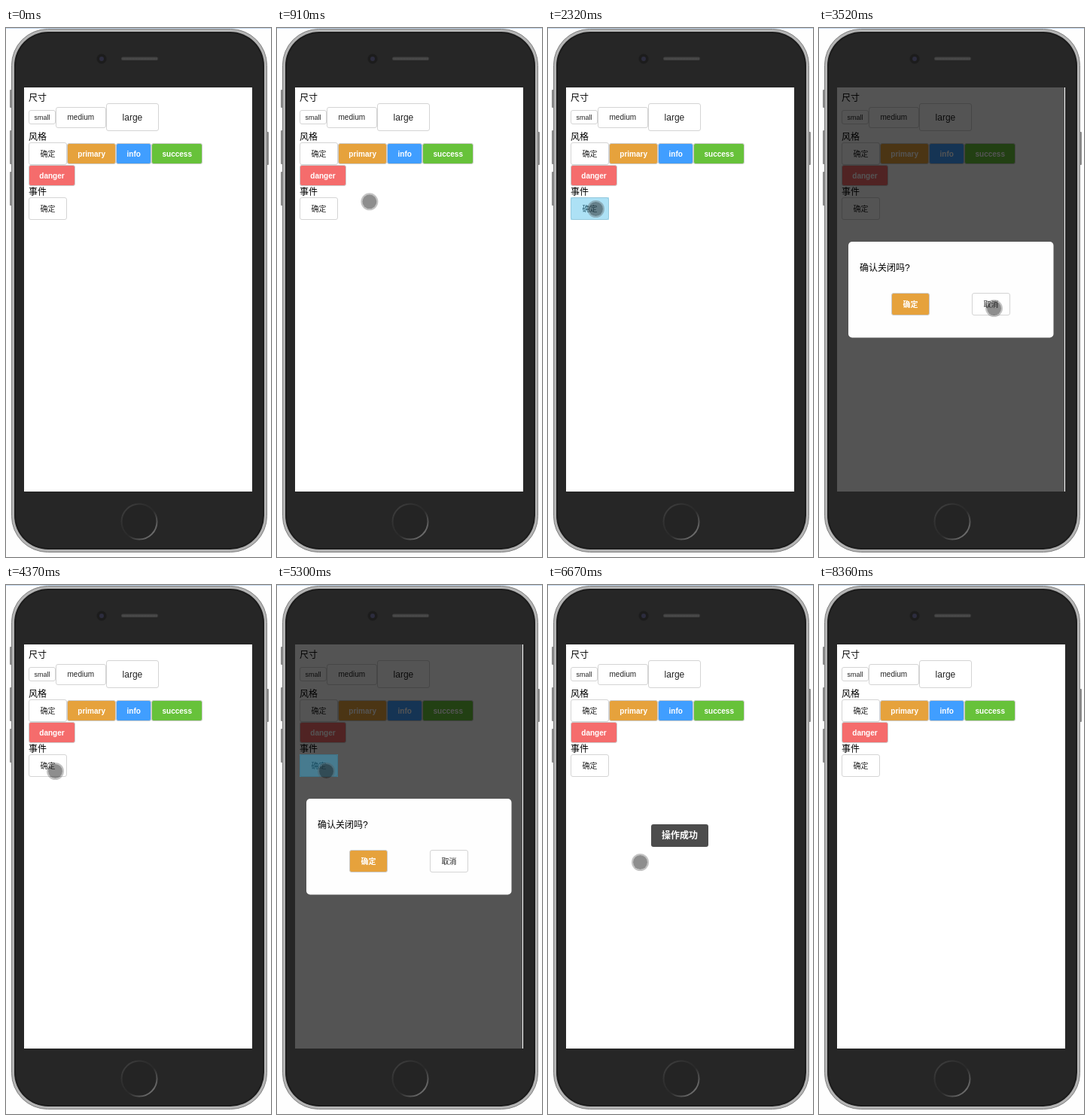
Recreate the animation shown at these times as an HTML page. Size 352 px wide and 703 px high, loop 8.92 s.

```html
<!DOCTYPE html>
<html lang="zh">
<head>
<meta charset="utf-8">
<style>
html, body { margin: 0; width: 100%; height: 100%; overflow: hidden; background: #fefefe; }
svg { display: block; width: 352px; height: 703px; }
text { font-family: "Liberation Sans", "Noto Sans CJK SC", "Noto Sans CJK", sans-serif; }
</style>
</head>
<body>
<svg viewBox="0 0 352 703" xmlns="http://www.w3.org/2000/svg">
  <defs>
    <linearGradient id="home" x1="0" x2="1" y1="0" y2="1">
      <stop offset="0" stop-color="#444"/><stop offset=".3" stop-color="#303030"/>
      <stop offset=".55" stop-color="#2a2a2a"/><stop offset="1" stop-color="#8a8a8a"/>
    </linearGradient>
  </defs>
  <rect width="352" height="1" fill="#c4d8ee"/>
  <g fill="#8a8a8a">
    <rect x="5" y="82" width="4" height="24" rx="1"/>
    <rect x="5" y="136" width="4" height="45" rx="1"/>
    <rect x="5" y="191" width="4" height="45" rx="1"/>
    <rect x="345" y="138" width="4" height="44" rx="1"/>
  </g>
  <rect x="7.5" y="1.5" width="339" height="695" rx="48" fill="#b4b4b4" stroke="#808080"/>
  <rect x="11" y="5" width="332" height="688" rx="45" fill="#1c1c1c"/>
  <rect x="13" y="7" width="328" height="684" rx="43" fill="#262626"/>
  <circle cx="127" cy="41" r="6.5" fill="#1c1c1c"/>
  <circle cx="127" cy="41" r="3" fill="#2c2c3e"/>
  <rect x="153" y="38.5" width="49" height="4.5" rx="2.2" fill="#404040"/>
  <path d="M155 40.8H200" stroke="#525252" stroke-width="2" stroke-dasharray="1 1"/>
  <circle cx="177" cy="656" r="23.5" fill="#242424" stroke="url(#home)" stroke-width="2"/>
  <rect x="24" y="79" width="303" height="537" fill="#fff"/>
  <g id="page"></g>
  <rect id="shade" x="24" y="79" width="302" height="537" fill-opacity=".67"/>
  <rect id="flash" x="30" y="225" width="51" height="30" fill="#33b5e5" fill-opacity=".4"/>
  <g id="dialog"><rect x="39" y="284" width="272.5" height="127.5" rx="5" fill="#fefefe"/></g>
  <g id="toast"><rect x="137" y="318" width="76" height="30" rx="3" fill="#4c4c4c"/></g>
  <g id="touch">
    <circle r="10.5" fill="none" stroke="#555" stroke-opacity=".35" stroke-width="2"/>
    <circle r="9.5" fill="#1e1e1e" fill-opacity=".5"/>
  </g>
</svg>
<script>
const LOOP = 8920;
const SAMPLE = 135;
const NS = "http://www.w3.org/2000/svg";
const $ = id => document.getElementById(id);

function add(parent, tag, attrs, label = "") {
  const el = document.createElementNS(NS, tag);
  for (const key in attrs) el.setAttribute(key, attrs[key]);
  el.textContent = label;
  parent.append(el);
  return el;
}

function write(parent, label, x, y, size = 12, fill = "#000", weight = 400) {
  return add(parent, "text", { x, y, "font-size": size, fill, "font-weight": weight }, label);
}

// Draws a button around its label and returns its right edge
function button(parent, label, x, mid, { size = 10, pad = 15.5, height = 30, fill } = {}) {
  const box = add(parent, "rect", { rx: 2.5, fill: fill || "#fff", stroke: fill ? "#ccc" : "#d4d4d4" });
  const text = write(parent, label, x + pad, mid + size * .38, size, fill ? "#fff" : "#222", fill ? 700 : 400);
  const right = x + text.getComputedTextLength() + 2 * pad;
  const left = Math.round(x), top = Math.round(mid - height / 2);
  const shape = { x: left + .5, y: top + .5, width: Math.round(right) - left - 1, height: height - 1 };
  for (const key in shape) box.setAttribute(key, shape[key]);
  return right;
}

function row(parent, mid, items) {
  items.reduce((x, [label, look]) => button(parent, label, x, mid, look), 30);
}

const tint = fill => ({ fill, pad: 14.3, height: 28 });
const orange = "#e6a23c";

const page = $("page");
write(page, "尺寸", 30, 97);
row(page, 118.5, [
  ["small", { size: 9, pad: 7.5, height: 19 }],
  ["medium", { height: 28 }],
  ["large", { size: 12, pad: 22, height: 37 }]
]);
write(page, "风格", 30, 149);
row(page, 167, [
  ["确定"], ["primary", tint(orange)], ["info", tint("#409eff")], ["success", tint("#67c23a")]
]);
row(page, 196, [["danger", tint("#f56c6c")]]);
write(page, "事件", 30, 222);
row(page, 240, [["确定"]]);

const dialog = $("dialog");
write(dialog, "确认关闭吗?", 54, 323);
button(dialog, "确定", 96, 367, { fill: orange });
button(dialog, "取消", 203, 367);
write($("toast"), "操作成功", 151, 337, 12, "#fff", 700);

const easeOut = u => 1 - (1 - u) ** 2;
const smooth = u => u ** 3 * (6 * u * u - 15 * u + 10);

const entry = { x: 337.5, y: 379.5 };
const moves = [
  { from: 400, to: 520, x: 177.5, y: 267.5, ease: easeOut },
  { from: 520, to: 1470, x: 65.5, y: 240.5, ease: easeOut, bend: -47 },
  { from: 1775, to: 1910, x: 63.5, y: 240.5, ease: easeOut },
  { from: 2440, to: 3080, x: 241.5, y: 375.5, ease: easeOut },
  { from: 3235, to: 3520, x: 232.5, y: 372.5, ease: easeOut },
  { from: 3950, to: 4280, x: 65.5, y: 247.5, ease: easeOut },
  { from: 5300, to: 5975, x: 122.5, y: 368.5, ease: smooth },
  { from: 7805, to: 8210, x: 272.5, y: 696, ease: smooth }
];

// The pointer is seen at a coarse sampling rate, so it jumps along its path
function pointer(t) {
  const i = moves.findLastIndex(m => m.from <= t);
  if (i < 0) return entry;
  const a = moves[i - 1] || entry, b = moves[i];
  const passed = Math.floor((t - b.from) / SAMPLE) * SAMPLE;
  const s = b.ease(Math.min(1, passed / (b.to - b.from)));
  return {
    x: a.x + (b.x - a.x) * s,
    y: a.y + (b.y - a.y) * s + (b.bend || 0) * 2 * s * (1 - s)
  };
}

function show(id, on) {
  $(id).setAttribute("visibility", on ? "visible" : "hidden");
}

function draw(t) {
  const within = (a, b) => t >= a && t < b;
  const open = within(2440, 3950) || within(5300, 6670);
  show("shade", open);
  show("dialog", open);
  show("flash", within(2320, 2580) || within(5300, 5450));
  show("toast", within(6670, 7630));
  show("touch", within(400, 8360));
  const { x, y } = pointer(t);
  $("touch").setAttribute("transform", `translate(${x} ${y})`);
}

const start = performance.now();
function tick() {
  draw((performance.now() - start) % LOOP);
  requestAnimationFrame(tick);
}
tick();
</script>
</body>
</html>
```
